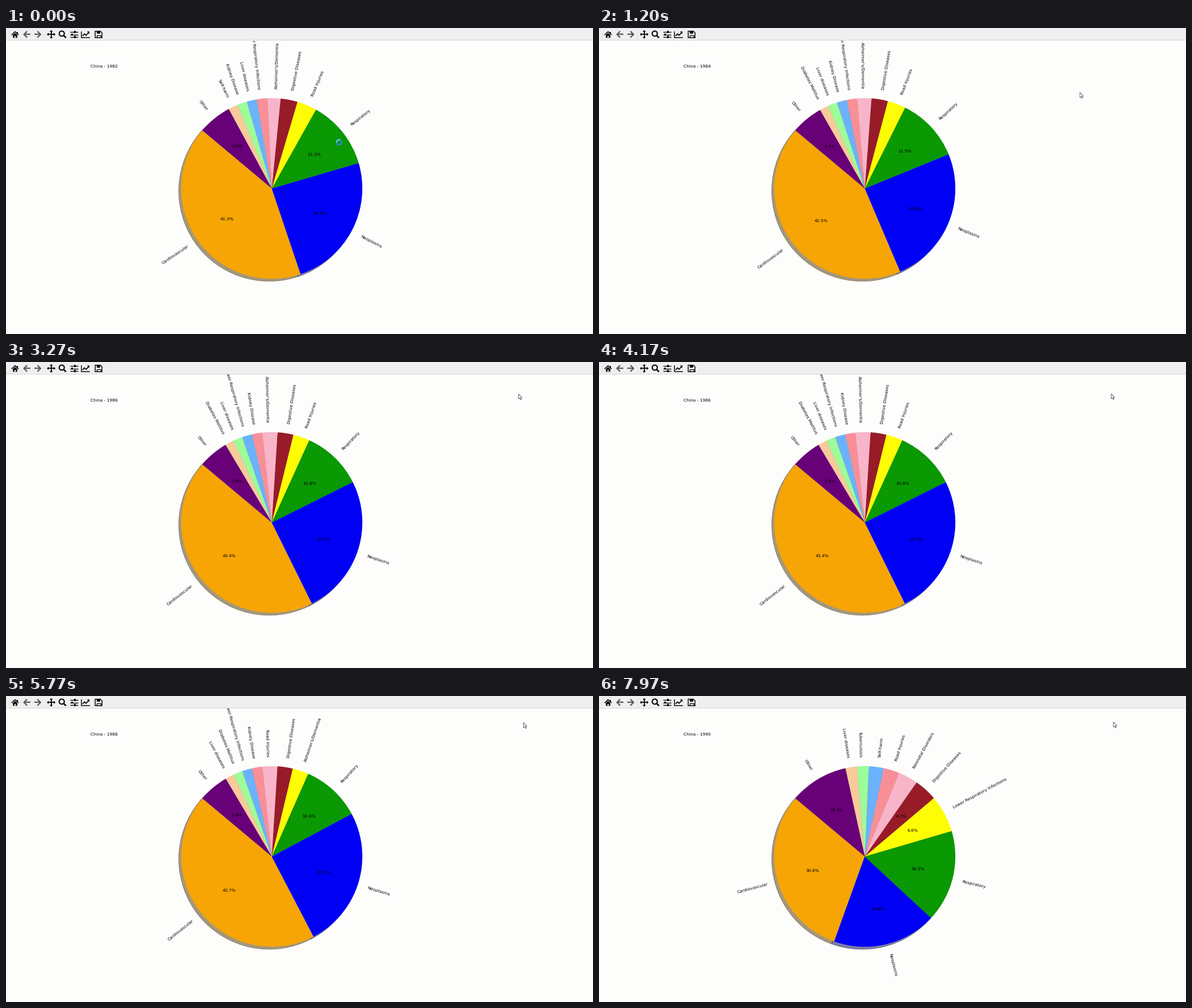
A matplotlib script for the animation above (8 s loop, 1035 px wide and 541 px high).

```python
import math

import matplotlib.pyplot as plt
import numpy as np
from matplotlib.animation import FuncAnimation
from matplotlib.patches import Arc, Circle, Polygon, Rectangle

WIDTH, HEIGHT, DPI = 1035, 541, 100
LOOP_MS, FRAMES = 8000, 240
FIRST_YEAR, LAST_YEAR = 1982, 1990
FIRST_CHANGE, YEAR_MS = 160, 1010
CENTER, RADIUS = (468.6, 283.7), 159.7
SLICES, FONT_SIZE = 10, 5.4
INK, MUTED, PAPER = "#080808", "#5a5a5a", "#fdfdfc"

COLORS = ["#f6a504", "#0000f4", "#0a9803", "#fffd03", "#981b28", "#f8b5ca",
          "#f88f97", "#6ab2fb", "#9cfd99", "#f8ca9a", "#680078"]

# Percent of deaths per cause in the first and the last year of each era.
MAJOR = ("Cardiovascular", "Neoplasms", "Respiratory")
EARLY = {
    "Cardiovascular": (41.26, 43.74),
    "Neoplasms": (24.4, 25.2),
    "Respiratory": (12.34, 10.6),
    "Road Injuries": (3.53, 2.64),
    "Digestive Diseases": (3.03, 2.73),
    "Alzheimer's/Dementia": (2.31, 2.85),
    "Lower Respiratory Infections": (1.92, 1.78),
    "Liver diseases": (1.78, 1.58),
    "Kidney Disease": (1.74, 1.88),
    "Self-harm": (1.69, 1.2),
    "Diabetes Mellitus": (1.5, 1.6),
}
LATE = {
    "Cardiovascular": (30.44, 30.62),
    "Neoplasms": (18.3, 18.58),
    "Respiratory": (16.34, 16.46),
    "Lower Respiratory Infections": (6.84, 6.64),
    "Digestive Diseases": (4.14, 4.12),
    "Neonatal Disorders": (3.6, 3.49),
    "Road Injuries": (2.9, 2.84),
    "Self-harm": (2.6, 2.66),
    "Tuberculosis": (2.2, 2.08),
    "Liver diseases": (2.15, 2.05),
}
ERAS = [(1982, 1988, EARLY), (1989, 1990, LATE)]

# Pointer path: time in ms, x, y of the tip.
POINTER = np.array([
    (860, 587, 197), (1200, 848, 114), (1560, 905, 57), (4260, 903, 56),
    (4600, 1005, 40), (5000, 921, 47), (5800, 912, 47), (6000, 907, 46),
])
ARROW = np.array([(0, 0), (0, 9), (2, 7.2), (3.6, 10.4), (4.9, 9.8),
                  (3.5, 6.8), (6.2, 6.8)])

plt.rcParams["font.family"] = "DejaVu Sans"
plt.rcParams["text.hinting"] = "none"
plt.rcParams["toolbar"] = "None"

fig = plt.figure(figsize=(WIDTH / DPI, HEIGHT / DPI), dpi=DPI, facecolor=PAPER)


def px(width):
    """Convert a line width from pixels to points."""
    return width * 72 / DPI


def ranking(year):
    """Largest causes of the year in order, with the rest as Other."""
    first, last, causes = next(era for era in ERAS if year <= era[1])
    u = (year - first) / (last - first)
    shares = {}
    for name, (start, end) in causes.items():
        progress = math.sin(u * math.pi / 2) if name in MAJOR else u
        shares[name] = start + (end - start) * progress
    top = sorted(shares, key=shares.get, reverse=True)[:SLICES]
    values = [shares[name] for name in top]
    return top + ["Other"], values + [100 - sum(values)]


def make_pie(year):
    labels, values = ranking(year)
    half = 1.25 * RADIUS
    ax = fig.add_axes([(CENTER[0] - half) / WIDTH,
                       1 - (CENTER[1] + half) / HEIGHT,
                       2 * half / WIDTH, 2 * half / HEIGHT], label=str(year))
    ax.pie(values, labels=labels, colors=COLORS, startangle=140,
           shadow=True, rotatelabels=True,
           autopct=lambda p: f"{p:.1f}%" if p > 4 else "",
           textprops={"size": FONT_SIZE}, wedgeprops={"linewidth": px(0.75)})
    return ax


pies = {year: make_pie(year) for year in range(FIRST_YEAR, LAST_YEAR + 1)}

stage = fig.add_axes([0, 0, 1, 1], zorder=5)
stage.set(xlim=(0, WIDTH), ylim=(HEIGHT, 0))
stage.axis("off")


def line(points, width, color=INK):
    xs, ys = zip(*points)
    stage.plot(xs, ys, color=color, lw=px(width),
               solid_capstyle="butt", solid_joinstyle="miter")


def fill(points, color=INK):
    stage.add_patch(Polygon(points, fc=color, ec="none", zorder=3))


def box(x, y, w, h, color=INK, zorder=3):
    stage.add_patch(Rectangle((x, y), w, h, fc=color, ec="none", zorder=zorder))


def draw_toolbar():
    box(0, 0, WIDTH, 21, "#efefef", 1)
    box(0, 21, WIDTH, 1, "#d6d6d2", 1)
    for x in (5.5, 67.5, 153.5):
        line([(x, 4), (x, 18)], 1, "#e2e2e2")

    # Home
    line([(9.8, 12.2), (16, 6.5), (22.2, 12.2)], 1.6)
    fill([(12, 12.4), (16, 8.8), (20, 12.4), (20, 17.3), (12, 17.3)])
    box(14.8, 13.8, 2.4, 3.5, "#efefef")
    box(18.8, 6.5, 1.7, 3.5)

    # Back and forward
    for tip, way in ((31, 1), (61.6, -1)):
        line([(tip + 12 * way, 11.3), (tip + way, 11.3)], 2.3, MUTED)
        line([(tip + 6.2 * way, 5.8), (tip + 0.7 * way, 11.3),
              (tip + 6.2 * way, 16.8)], 2.3, MUTED)

    # Pan
    middle = np.array((79.7, 11.3))
    for way in np.array([(1, 0), (-1, 0), (0, 1), (0, -1)]):
        side = 2.9 * way[::-1]
        line([middle, middle + 5.5 * way], 1.9)
        base = middle + 4.6 * way
        fill([base + side, base - side, middle + 7.6 * way])

    # Zoom
    stage.add_patch(Circle((98.3, 9.9), 4.5, fc="none", ec=INK, lw=px(2.1), zorder=3))
    line([(101.4, 13), (105.8, 17.4)], 2.6)

    # Sliders
    for y, knob in ((7, 121.8), (11.5, 116.5), (16, 121.8)):
        line([(113, y), (126.6, y)], 1.4)
        box(knob - 1.4, y - 1.9, 2.8, 3.8)

    # Chart
    line([(133, 5.6), (133, 17), (148.2, 17)], 1.5)
    line([(135, 14), (138.3, 10.4), (141, 12.9), (146, 7.8)], 1.8)
    fill([(143, 6.3), (147.2, 6.3), (147.2, 10.5)])

    # Save
    line([(163, 5.6), (166.4, 5.6), (169.3, 8.5), (169.3, 17.2), (157.3, 17.2),
          (157.3, 5.6), (163, 5.6)], 1.5)
    box(159.6, 5.6, 5.9, 4)
    line([(160, 17), (160, 12.6), (166.6, 12.6), (166.6, 17)], 1.3)


draw_toolbar()
title = stage.text(149, 69.8, "", size=FONT_SIZE, color="black")

ring = stage.add_patch(Circle((587.4, 202), 4.4, fc="none", ec="#2d8de6", lw=px(2.2)))
glint = stage.add_patch(Arc((587.4, 202), 8.8, 8.8, theta1=0, theta2=110,
                            ec="#7cc4fb", lw=px(2.2), zorder=4))
arrow = stage.add_patch(Polygon(ARROW, fc="white", ec="#44444e", lw=px(0.8), zorder=4))


def update(frame):
    t = frame * LOOP_MS / FRAMES
    year = FIRST_YEAR + 1 + math.floor((t - FIRST_CHANGE) / YEAR_MS)
    for key, ax in pies.items():
        ax.set_visible(key == year)
    title.set_text(f"China - {year}")

    times, xs, ys = POINTER.T
    busy = t < times[0]
    ring.set_visible(busy)
    glint.set_visible(busy)
    glint.set_angle(180 + 0.36 * t)
    arrow.set_visible(not busy)
    arrow.set_xy(ARROW + (np.interp(t, times, xs), np.interp(t, times, ys)))
    return []


animation = FuncAnimation(fig, update, frames=FRAMES, interval=LOOP_MS / FRAMES,
                          repeat=True, repeat_delay=0, blit=False)
plt.show()
```
